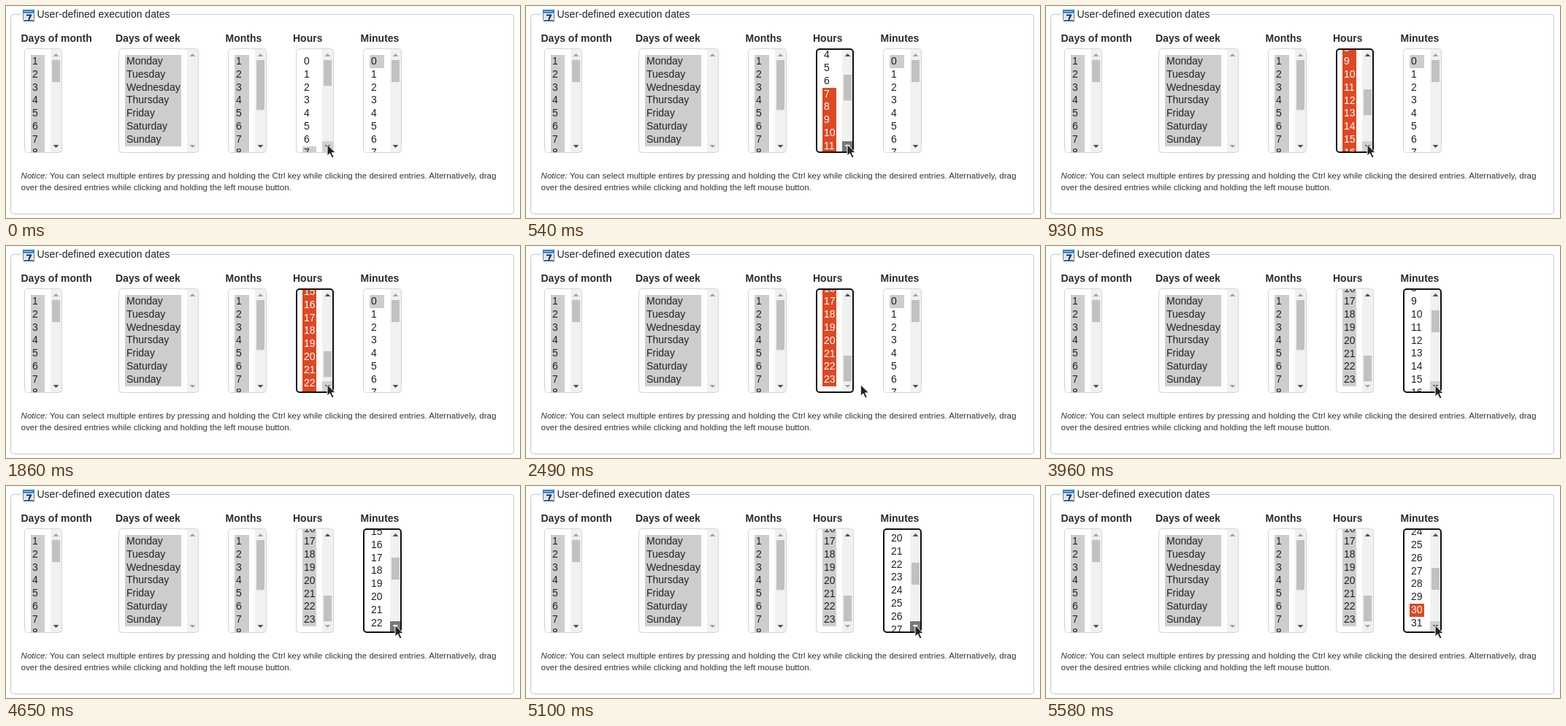
Recreate the animation shown at these times as an HTML page. Size 704 by 290 pixels, loop 6060 ms.

```html
<!DOCTYPE html>
<html lang="en">
<head>
<meta charset="utf-8">
<style>
  html, body { margin: 0; width: 100%; height: 100%; overflow: hidden; background: #fff; }
  #stage { display: block; font: 14px "Liberation Sans", Arial, sans-serif; fill: #222; }
  .heading { font-weight: bold; fill: #2b2b2b; }
  .notice { font-size: 11.62px; fill: #333; }
</style>
</head>
<body>
<svg id="stage" width="704" height="290" viewBox="0 0 704 290">
  <rect x="6.5" y="11.5" width="689" height="273" rx="4" fill="none" stroke="#c8c8c8"/>
  <rect x="21" y="4" width="206" height="18" fill="#fff"/>
  <g id="icon">
    <rect x="23.5" y="5.5" width="15" height="14" rx="1" fill="#f4f8fc" stroke="#4a7fb5"/>
    <rect x="23" y="5" width="16" height="5" fill="#3f7fc4"/>
    <path d="M25 7.5H37" stroke="#b9d5ef" stroke-dasharray="2 1"/>
    <path d="M24 12.5H38M24 15.5H38M26.5 10V19M35.5 10V19" stroke="#c5d7e8"/>
    <path d="M28 12.5H34L31 19" fill="none" stroke="#17294a" stroke-width="2"/>
    <path d="M24 20.5H39" stroke="#2d5685"/>
  </g>
  <text x="42.5" y="16">User-defined execution dates</text>
  <g id="columns"></g>
  <g class="notice">
    <text x="20.5" y="236"><tspan font-style="italic">Notice:</tspan> You can select multiple entires by pressing and holding the Ctrl key while clicking the desired entries. Alternatively, drag</text>
    <text x="20.5" y="252">over the desired entries while clicking and holding the left mouse button.</text>
  </g>
  <path id="cursor" d="M0 0V15.5L3.6 12.2L6.4 18.3L9 17.1L6.2 11.2H11.3Z" fill="#222" stroke="#fff" stroke-width="1" stroke-linejoin="round"/>
</svg>
<script>
const LOOP = 6060, FRAME = 30, CLICK = 150, PRESS = 90, LINE = 40;
const TOP = 58, HEIGHT = 143, VIEW = HEIGHT - 2, ROW = 17.8, PAD = 8;
const TRACK_TOP = 74, TRACK = 111;

const range = (from, to) => Array.from({ length: to - from + 1 }, (_, i) => from + i);
const weekdays = ['Monday', 'Tuesday', 'Wednesday', 'Thursday', 'Friday', 'Saturday', 'Sunday'];
const all = () => true;

const columns = [
  { title: 'Days of month', titleX: 20.5, x: 25, width: 52, items: range(1, 31), selected: all },
  { title: 'Days of week', titleX: 150, x: 154, width: 110, items: weekdays, selected: all },
  { title: 'Months', titleX: 300.5, x: 304, width: 53, items: range(1, 12), selected: all },
  { title: 'Hours', titleX: 393, x: 397, width: 52, items: range(0, 23), selected: n => n >= 7,
    clicks: [30, 180, 540, 780, 1110, 1590, 1710, 1890], focus: [30, 3240] },
  { title: 'Minutes', titleX: 485.5, x: 489, width: 53, items: range(0, 59), selected: n => n % 30 === 0,
    clicks: [3240, 3570, 3690, 3810, 4050, 4230, 4440, 4650, 4890, 5100, 5310], focus: [3240, LOOP] }
];

const clamp01 = v => Math.max(0, Math.min(1, v));
const ease = v => { v = clamp01(v); return v * v * (3 - 2 * v); };

function add(parent, tag, attrs, text) {
  const node = document.createElementNS('http://www.w3.org/2000/svg', tag);
  set(node, attrs);
  if (text !== undefined) node.textContent = text;
  parent.appendChild(node);
  return node;
}

function set(node, attrs) {
  for (const name in attrs) node.setAttribute(name, attrs[name]);
}

function build(col) {
  const root = document.getElementById('columns');
  const barX = col.x + col.width - 16, mid = barX + 7.5;
  col.barX = barX;
  col.max = Math.max(0, col.items.length * ROW + 2 * PAD - VIEW);
  col.thumbSize = Math.max(30, TRACK * VIEW / (VIEW + col.max));

  add(root, 'text', { x: col.titleX, y: 49, class: 'heading' }, col.title);
  const view = add(root, 'svg', { x: col.x + 1, y: TOP + 1, width: col.width - 2, height: VIEW });
  col.list = add(view, 'g', {});
  col.rows = [];
  col.items.forEach((item, i) => {
    const y = PAD + i * ROW, on = col.selected(item);
    const back = on && add(col.list, 'rect', { x: 8, y, width: col.width - 33, height: ROW + 0.1, 'shape-rendering': 'crispEdges' });
    const label = add(col.list, 'text', { x: 10, y: y + 13 }, item);
    if (on) col.rows.push({ back, label });
  });

  add(root, 'rect', { x: barX, y: TOP + 1, width: 15, height: VIEW, fill: '#f1f1f1' });
  col.button = add(root, 'rect', { x: barX, y: 185, width: 15, height: 15 });
  if (col.max) col.thumb = add(root, 'rect', { x: barX + 2, width: 11, height: col.thumbSize, fill: '#c1c1c1' });
  col.up = add(root, 'path', { d: `M${mid - 4} 69H${mid + 4}L${mid} 65Z` });
  col.down = add(root, 'path', { d: `M${mid - 4} 190H${mid + 4}L${mid} 194Z` });
  col.border = add(root, 'rect', { fill: 'none' });
}

function drawColumn(col, t, cursorX) {
  const clicks = col.clicks || [];
  const distance = clicks.reduce((sum, c) => sum + LINE * ease((t - c) / CLICK), 0);
  const scroll = Math.min(col.max, distance);
  const focused = !!col.focus && t >= col.focus[0] && t < col.focus[1];
  const atEnd = scroll >= col.max;
  const pressed = clicks.some(c => t >= c && t < c + PRESS);
  const hovered = !atEnd && cursorX >= col.barX && cursorX < col.barX + 15;
  const inset = focused ? 1 : 0.5;

  set(col.list, { transform: `translate(0 ${-scroll})` });
  for (const { back, label } of col.rows) {
    set(back, { fill: focused ? '#de4822' : '#cdcdcd' });
    set(label, { fill: focused ? '#fff' : '#222' });
  }
  if (col.thumb) set(col.thumb, { y: Math.round(TRACK_TOP + scroll / col.max * (TRACK - col.thumbSize)) });
  set(col.button, { fill: pressed ? '#787878' : hovered ? '#d2d2d2' : '#f1f1f1' });
  set(col.up, { fill: scroll > 0 ? '#505050' : '#a3a3a3' });
  set(col.down, { fill: pressed ? '#fff' : atEnd ? '#a3a3a3' : '#505050' });
  set(col.border, {
    x: col.x + inset, y: TOP + inset, width: col.width - 2 * inset, height: HEIGHT - 2 * inset, rx: 4,
    stroke: focused ? '#101010' : '#d4d4d4', 'stroke-width': 2 * inset
  });
}

function draw(now) {
  const t = Math.floor(now % LOOP / FRAME) * FRAME;
  const travel = (ease((t - 2400) / 210) + ease((t - 2730) / 300)) / 2;
  const cursorX = 440 + 93 * travel;
  columns.forEach(col => drawColumn(col, t, cursorX));
  set(document.getElementById('cursor'), { transform: `translate(${cursorX} ${189.5 + travel})` });
}

columns.forEach(build);
const start = performance.now();
function tick() {
  draw(performance.now() - start);
  requestAnimationFrame(tick);
}
tick();
</script>
</body>
</html>
```
